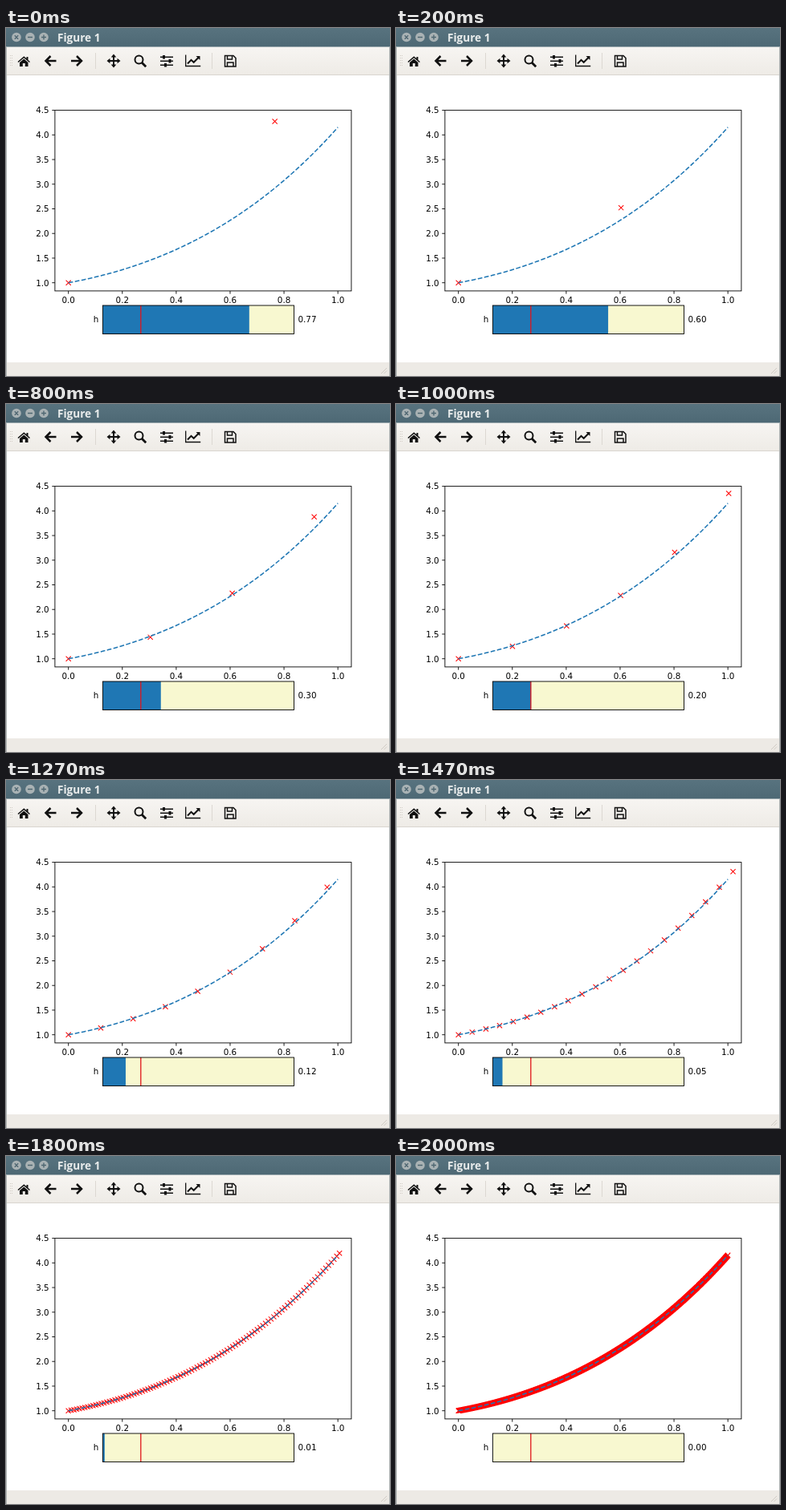
Write an HTML page that moves like this. It is 478 by 434 pixels and loops after 2.19 s.

```html
<!DOCTYPE html>
<html lang="en">
<head>
<meta charset="utf-8">
<title>Figure 1</title>
<style>
  html, body { margin: 0; width: 100%; height: 100%; overflow: hidden; background: #fff; }
  svg { display: block; width: 478px; height: 434px; }
  text { font: 10.33px "DejaVu Sans", sans-serif; }
  .title { font: 700 13.6px "Open Sans", sans-serif; fill: #e9ecec; }
  .line { fill: none; stroke: #000; stroke-width: .9; }
  .icon { fill: none; stroke: #111; stroke-width: 2; }
  .end { text-anchor: end; }
  .mid { text-anchor: middle; }
</style>
</head>
<body>
<svg viewBox="0 0 478 434">
  <defs>
    <linearGradient id="bar" x2="0" y2="1"><stop stop-color="#58737f"/><stop offset="1" stop-color="#4d6874"/></linearGradient>
    <linearGradient id="tools" x2="0" y2="1"><stop stop-color="#f7f5f2"/><stop offset="1" stop-color="#eeebe6"/></linearGradient>
    <clipPath id="axes"><rect x="60.9" y="102.6" width="369" height="225.3"/></clipPath>
  </defs>

  <!-- window -->
  <rect width="478" height="434" fill="#fff"/>
  <rect width="478" height="24" fill="url(#bar)"/>
  <g fill="#a9b2b4"><circle cx="13" cy="11.5" r="5.8"/><circle cx="30" cy="11.5" r="5.8"/><circle cx="47" cy="11.5" r="5.8"/></g>
  <path d="M10.8 9.3l4.4 4.4m0-4.4l-4.4 4.4M27 11.5h6M44 11.5h6M47 8.5v6" stroke="#4f6772" stroke-width="1.4"/>
  <text class="title" x="64" y="16.8">Figure 1</text>
  <rect y="23.5" width="478" height="35" fill="url(#tools)"/>
  <path d="M0 58.5H478" stroke="#d9d5cf"/>
  <rect y="417" width="478" height="17" fill="#edeae5"/>
  <path d="M111.5 31v20M256.5 31v20" stroke="#dcd8d2"/>
  <path d="M5.5 34v15M7.5 34v15" stroke="#cfcac3" stroke-dasharray="1 2"/>
  <path d="M467 431l7-7M470.500 431l3.500-3.500" stroke="#d0cbc4"/>
  <path d="M.5 24V434M477.500 24V434" stroke="#aeb3b3"/>

  <!-- toolbar icons -->
  <path d="M14.500 42L22.300 35.300 25.500 38V36h2v3.700L30 42l-1 1-6.700-5.700L15.500 43zM17 43l5.300-4.500L27.500 43v5h-3.700v-4h-3v4H17z" fill="#111"/>
  <path class="icon" stroke-width="2.6" d="M62.500 41H50M55.500 35l-6 6 6 6M81 41h12.500M88 35l6 6-6 6" style="stroke-width:2.500"/>
  <path class="icon" d="M127 41h14M134 34v14"/>
  <path d="M134 32.500l3.300 4h-6.600zM134 49.500l3.300-4h-6.600zM125.500 41l4-3.300v6.600zM142.500 41l-4-3.300v6.600z" fill="#111"/>
  <circle class="icon" cx="165.500" cy="39.500" r="5"/>
  <path class="icon" d="M169.200 43.200l5 5" style="stroke-width:2.800"/>
  <path class="icon" d="M192 36.300h16M192 41.300h16M192 46.300h16" style="stroke-width:1.400"/>
  <path class="icon" d="M196.500 34v4.600M204 39v4.600M198.500 44v4.600" style="stroke-width:3"/>
  <path class="icon" d="M223.700 33.500v14h18.500" style="stroke-width:1.300"/>
  <path class="icon" d="M226 44.500l4.500-4.700 3.200 3 6-6"/>
  <path d="M236.500 35h5v5z" fill="#111"/>
  <path class="icon" d="M272.500 34.500h10.500l3 3v10.500h-13.500zM275.500 35v4h6v-4M275.500 48v-5h7.500v5" style="stroke-width:1.500"/>

  <!-- plot -->
  <g id="ticks"></g>
  <g clip-path="url(#axes)">
    <path id="marks" fill="none" stroke="#f00" stroke-width="1.030"/>
    <path id="curve" fill="none" stroke="#1f77b4" stroke-width="1.550" stroke-dasharray="5.730 2.480"/>
  </g>
  <rect class="line" x="60.900" y="102.600" width="369" height="225.300"/>

  <!-- slider -->
  <rect x="120.400" y="346" width="238.100" height="35.500" fill="#f8f8d0"/>
  <rect id="fill" x="120.400" y="346" height="35.500" fill="#1f77b4"/>
  <path d="M167.800 346v35.500" stroke="#e0161c" stroke-width="1.300"/>
  <rect class="line" x="120.400" y="346" width="238.100" height="35.500"/>
  <text class="end" x="115.300" y="366.800">h</text>
  <text id="value" x="363.500" y="366.800"></text>
</svg>
<script>
const LOOP = 2190;
// [start ms, step size h]
const STEPS = [
  [0, .766], [70, .725], [140, .66], [200, .6035], [400, .52], [470, .44], [600, .3975], [670, .345],
  [800, .304], [1000, .2006], [1200, .14], [1270, .12], [1340, .085], [1400, .0635], [1470, .05095],
  [1600, .0165], [1800, .01016], [2000, .0008]
];
const el = id => document.getElementById(id);
const px = x => 77.7 + 335.45 * x;
const py = y => 317.7 - 61.46 * (y - 1);

let ticks = '';
for (let i = 0; i <= 5; i++) {
  const x = px(i / 5);
  ticks += `<path class="line" d="M${x} 328v3.600"/><text class="mid" x="${x}" y="343.300">${(i / 5).toFixed(1)}</text>`;
}
for (let y = 1; y <= 4.5; y += .5) {
  ticks += `<path class="line" d="M60.900 ${py(y)}h-3.600"/><text class="end" x="53.700" y="${py(y) + 3.8}">${y.toFixed(1)}</text>`;
}
el('ticks').innerHTML = ticks;

// exact solution of y' = y + 2x, y(0) = 1
el('curve').setAttribute('d', 'M' + Array.from({ length: 101 }, (_, i) => {
  const x = i / 100;
  return `${px(x)} ${py(3 * Math.exp(x) - 2 * x - 2)}`;
}).join('L'));

const cross = (x, y) => `M${px(x) - 3.1} ${py(y) - 3.1}l6.200 6.200m0-6.200l-6.200 6.200`;

// semi-implicit Euler with step h
function crosses(h) {
  let x = 0, y = 1, d = cross(x, y);
  while (x < 1) {
    y = (y + 2 * h * x) / (1 - h);
    x += h;
    d += cross(x, y);
  }
  return d;
}

let shown;
function draw(now) {
  const t = now % LOOP;
  const h = STEPS.findLast(step => step[0] <= t)[1];
  if (h !== shown) {
    shown = h;
    el('marks').setAttribute('d', crosses(h));
    el('fill').setAttribute('width', 238.1 * h);
    el('value').textContent = h.toFixed(2);
  }
  requestAnimationFrame(() => draw(performance.now()));
}
draw(0);
</script>
</body>
</html>
```
